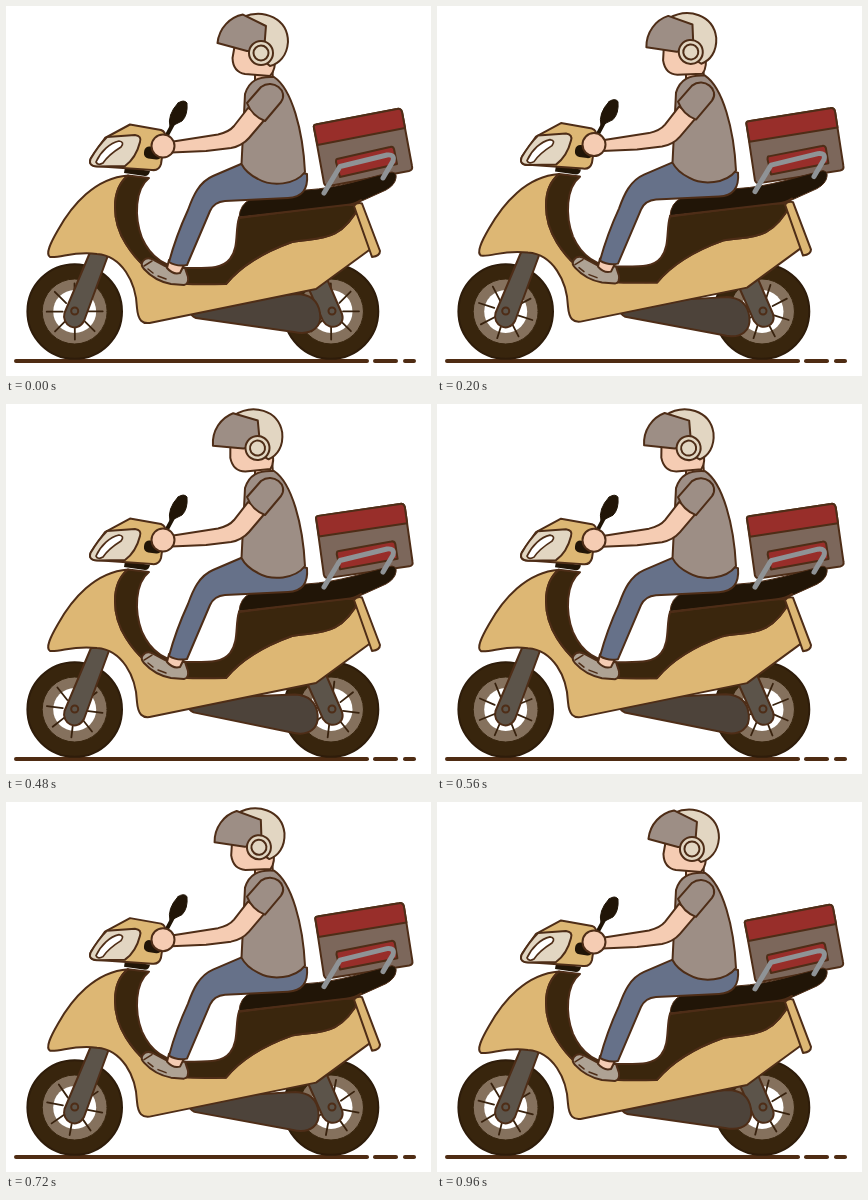
These frames come from a looping animation (425x370 px, 1000 ms). An HTML page:

```html
<!DOCTYPE html>
<html lang="en">
<head>
<meta charset="utf-8">
<title>Scooter</title>
<style>
html, body { margin: 0; width: 100%; height: 100%; overflow: hidden; background: #fff; }
svg { display: block; width: 425px; height: 370px; }
svg * { stroke-linecap: round; stroke-linejoin: round; }
.o { stroke: #4e2d17; stroke-width: 2; }
.n { fill: none; }
.gold { fill: #ddb774; }
.dark { fill: #3a260d; }
.black { fill: #211507; }
.skin { fill: #f5ccb3; }
.cream { fill: #e2d6c2; }
.shirt { fill: #9d8e85; }
.red { fill: #982e2a; }
.metal { fill: #5c544a; }
</style>
</head>
<body>
<svg viewBox="0 0 425 370">
  <defs>
    <g id="wheel">
      <circle r="47.300" fill="#38250d" stroke="#2e1c0a" stroke-width="2"/>
      <circle r="32.5" fill="#85715d" stroke="#38250d"/>
      <circle r="21.5" fill="#fff"/>
      <g class="spokes" stroke="#38220e" stroke-width="1.8"></g>
    </g>
  </defs>

  <path class="n" d="M10 355H361M369 355H390M399 355H408" stroke="#4f2c13" stroke-width="4"/>
  <use href="#wheel" x="68.7" y="305.5"/>
  <use href="#wheel" x="325" y="305.5"/>
  <path class="o metal" d="M85 244L58.5 307C55 319 71 328 78 315L104 244Z"/>
  <path class="o metal" d="M298 272L317 315C324 326 340 320 336 308L318 266Z"/>
  <g class="o n"><circle cx="68.7" cy="305" r="3.5"/><circle cx="326" cy="305" r="3.5"/></g>

  <g id="bike">
    <g id="exhaust">
      <path class="o" fill="#4d433a" d="M190 298Q179 307 190 312L288 326C308 330 316 319 314 307C312 294 304 288 290 288Z"/>
    </g>

    <g id="box">
      <path class="o" fill="#7c675b" d="M308 122Q307 119 310 118.500L391 103Q395 102 396 106L406 160Q407 164 403 165L323 180Q319 181 318 177Z"/>
      <path class="o red" d="M308 122Q307 119 310 118.500L391 103Q395 102 396 106L399 122L311.500 139Z"/>
      <path class="o red" d="M331 153L384 141Q387 140 388 143L391 158L334 171L330 156Q330 153 331 153Z"/>
    </g>

    <path class="o gold" d="M44 251C39 248 45 236 52 224C66 199 89 172 122 169.500C104 184 106 216 120 238C130 254 146 270 164 276L220 278C234 261 258 246 286 236C312 231 334 238 354 199L366 242L310 283L146 316.500C136 319 132 314 131 302C130 276 116 250 91 248C67 245 56 252 44 251Z"/>
    <path class="o dark" d="M122 169.500C104 184 106 216 120 238C130 254 146 270 164 276Q174 279 220 278C234 261 258 246 286 236C312 231 334 238 354 199L333 199L233 212C229 224 233 242 224 253C216 263 203 262 181 262C158 262 144 250 136 232C128 211 129 183 143 172Z"/>
    <path class="o gold" d="M348 200Q351 196 356 197.500L374 245Q374 250 366 251Z"/>
    <path class="black" stroke="#4e2d17" d="M233 211Q234 198 245 193L300 184C334 182 360 172 386 166Q391 167 390 172Q389 179 380 184L349 198Z"/>
    <path class="n" stroke="#4e2d17" stroke-width="2" d="M233 211.500L340 199Q349 198 355 194"/>
    <path class="n" stroke="#8f9396" stroke-width="5" d="M318 187L334 160.500L381 149Q389 148 387 155L377 172"/>

    <path class="black" d="M119 161L144 165Q143 170 139 170L118 167Z"/>
    <path class="n" d="M160 131L168 116" stroke="#211507" stroke-width="4"/>
    <path class="black" stroke="#211507" d="M172 97Q178 93 181 97Q182 109 176 115L164 121Q161 109 172 97Z"/>
    <path class="o gold" d="M99 132L124 118.500L155 124Q160 126 159 131L155 158Q153 165 146 164L88 160Q82 158 85 152Z"/>
    <path class="o cream" d="M101 131L129 129Q136 130 134 136Q130 152 119 160L91 160.500Q82 160 84.500 153Q92 140 101 131Z"/>
    <path fill="#fff" stroke="#4e2d17" stroke-width="1.700" d="M90 156C95 145 104 137 113 135Q119 136 115 141C107 146 101 151 97 157Q92 160 90 156Z"/>
    <rect class="black" x="138" y="141" width="18" height="12" rx="5" transform="rotate(8 147 147)"/>

    <path class="o" fill="#aea294" d="M161 261L148 254Q141 250 137 255Q134 259 138 263Q149 275 165 278L178 279Q183 278 182 271L179 262Z"/>
    <path class="n" stroke="#4e2d17" stroke-width="1.500" d="M142 263L147 267M152 270L160 273M146 255L138 260"/>
    <path class="o skin" d="M163 254L161 262Q167 269 174 267L179 257Z"/>
    <path class="o" fill="#667189" d="M242 155L207 170C193 176 187 190 182 204Q170 230 163 256Q171 261 181 259L204 205Q208 196 219 195L282 192Q303 191 301 168Z"/>

    <path class="o skin" d="M249 60L249 74Q258 79 267 73L266 60Z"/>
    <path class="o shirt" d="M239 88C243 75 252 70 268 71C286 83 297 125 299 166C289 179 266 181 252 173Q240 167 235.500 158Z"/>
    <path class="o skin" d="M164 136L212 128.500Q223 126 228 120L242 102L260 112L243 132Q236 140 225 142L200 145L165 146.500Z"/>
    <path class="o shirt" d="M241 97L255 81C267 72 283 85 275 96L259 115Q246 110 241 97Z"/>
    <circle class="o skin" cx="157" cy="140" r="11.500"/>

    <g id="head">
      <path class="o skin" d="M229 38L226.500 52Q227 66 239 68L264 70Q270 64 269 50Z"/>
      <path class="o cream" d="M237 11C258 2 282 13 282 36C281 50 273 58 264 60L245 44Z"/>
      <path class="o shirt" d="M211.500 37C213 22 224 11 237 8.500L260 20L258 45L241 45Z"/>
      <circle class="o cream" cx="255" cy="47" r="12"/>
      <circle class="o cream" cx="255" cy="47" r="7.500"/>
    </g>
  </g>
</svg>
<script>
const $ = id => document.getElementById(id);
const move = (id, value) => $(id).setAttribute("transform", value);
const spokes = document.querySelector(".spokes");
for (let a = 0; a < 360; a += 45)
  spokes.innerHTML += `<path d="M12 0H28" transform="rotate(${a})"/>`;

function draw(now) {
  const t = now % 1000 / 1000;
  const lift = (1 - Math.cos(2 * Math.PI * t)) / 2;
  // The tilt rises faster than it settles and rests briefly at the end.
  const tilt = Math.sin(Math.PI * Math.min(t / 0.96, 1) ** 0.9);
  spokes.setAttribute("transform", `rotate(${-360 * t})`);
  move("bike", `translate(0 ${-4 * lift})`);
  move("head", `translate(${-3.5 * lift} ${lift}) rotate(${-10 * tilt} 255 47)`);
  move("box", `rotate(${2.5 * tilt} 372 172)`);
  move("exhaust", `translate(${-2 * tilt} 0) rotate(${3.5 * tilt} 184 305)`);
  requestAnimationFrame(draw);
}
draw(performance.now());
</script>
</body>
</html>
```
